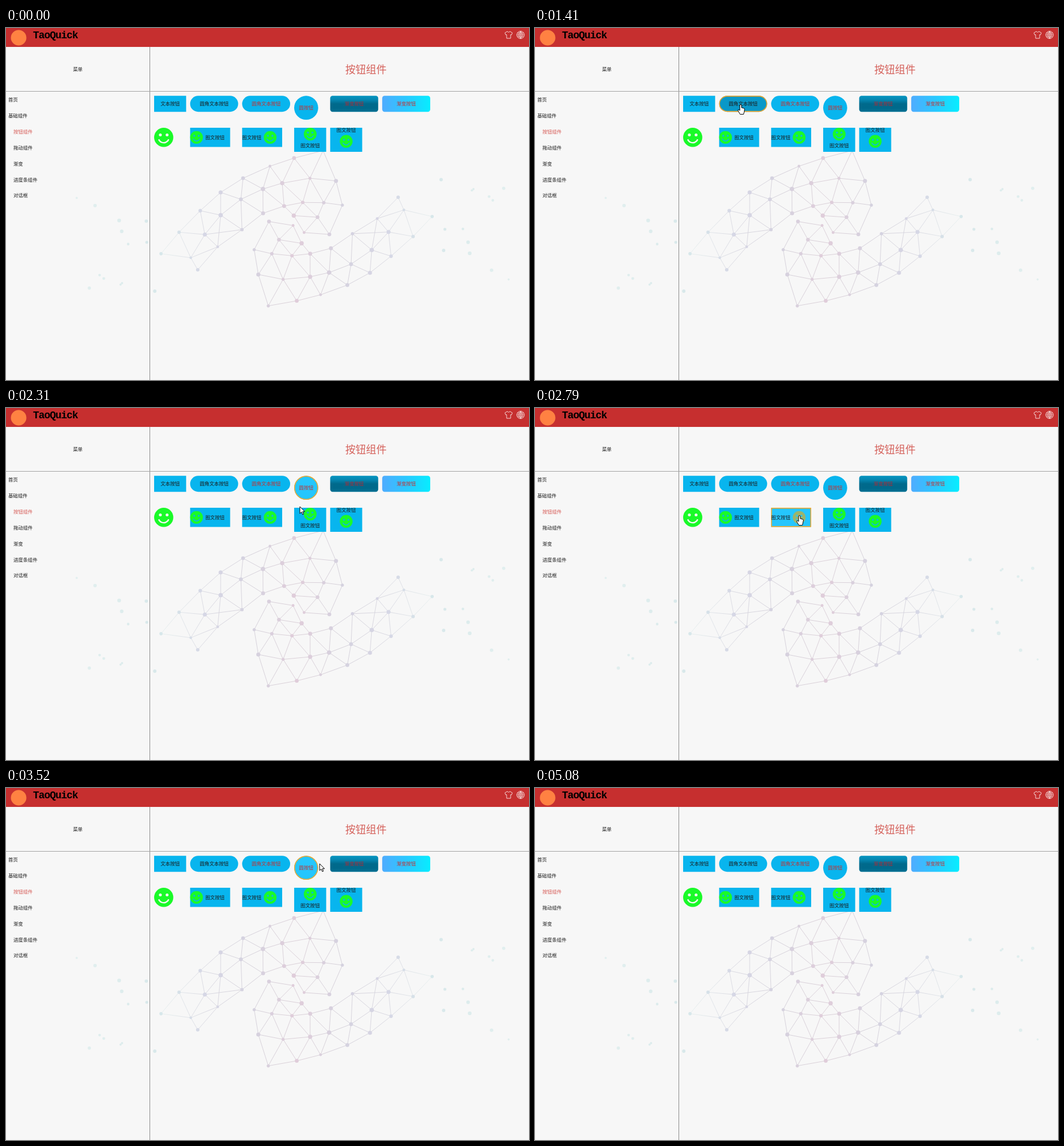
Animation, 911 px wide and 614 px high, one loop 5590 ms. Source, as an HTML page with a canvas:

```html
<!DOCTYPE html>
<html lang="zh-CN">
<head>
<meta charset="utf-8">
<style>
html, body { margin: 0; height: 100%; overflow: hidden; background: #f7f7f7; }
canvas { display: block; }
</style>
</head>
<body>
<canvas id="stage" width="911" height="614"></canvas>
<script>
const c = document.getElementById('stage').getContext('2d');
const LOOP = 5590, HOVER_LAG = 35;
const UNIT = 0.697; // stage pixels per layout unit
const PAPER = '#f7f7f7', RED = '#c62f2f', INK = '#1c1c1c', BLUE = '#08b5ee';
const CJK = '"Noto Sans CJK SC", "Noto Sans CJK", sans-serif';

// Pointer path: time, x, y
const path = [
  [190, 812, 612], [740, 305, 141], [1410, 358, 134], [1920, 503, 138], [2270, 520, 157],
  [2310, 512, 172], [2790, 461, 188], [3100, 345, 190], [3520, 546, 132], [3670, 590, 133],
  [4270, 598, 162], [4330, 593, 198], [4810, 605, 341], [5075, 886, 614]];

const menu = ['首页', '基础组件', '按钮组件', '拖动组件', '渐变', '进度条组件', '对话框'];

// Both rows share one column grid; sizes here are in layout units.
const rows = [
  [
    { w: 80, h: 40, label: '文本按钮' },
    { w: 120, h: 40, r: 20, label: '圆角文本按钮' },
    { w: 120, h: 40, r: 20, label: '圆角文本按钮', ink: RED },
    { w: 60, h: 60, r: 30, label: '圆按钮', ink: RED },
    { w: 120, h: 40, r: 6, label: '渐变按钮', ink: '#b02a35', vertical: true,
      stops: ['#0594c0', '#0586b0', '#006a8c', '#00698b', '#027093'] },
    { w: 120, h: 40, r: 6, label: '渐变按钮', ink: RED, stops: ['#4facfe', '#2ac8ff', '#06edff'] },
  ], [
    { w: 48, h: 48, icon: [24, 24, 24] },
    { w: 100, h: 48, label: '图文按钮', tx: 62, icon: [16, 24, 16] },
    { w: 100, h: 48, label: '图文按钮', tx: 24, icon: [70, 24, 16] },
    { w: 80, h: 60, label: '图文按钮', ty: 44, icon: [40, 16, 16] },
    { w: 80, h: 60, label: '图文按钮', ty: 6, icon: [40, 34, 16], hot: '#62a0da' },
  ]];

const buttons = rows.flatMap((row, j) => {
  let x = 0;
  return row.map(b => {
    const placed = { ...b, x: 258 + x * UNIT, y: 118.3 + j * 80 * UNIT };
    x += Math.max(b.w, rows[0][row.indexOf(b)].w, 80) + 10;
    return placed;
  });
});

let seed = 11;
function random() {
  seed = (seed * 16807) % 2147483647;
  return seed / 2147483647;
}
const between = (lo, hi) => lo + (hi - lo) * random();

// Nodes spread along a quadratic curve
function strand(count, x0, y0, cx, cy, x1, y1) {
  return Array.from({ length: count }, (_, i) => {
    const t = i / (count - 1), s = 1 - t;
    return {
      x: s * s * x0 + 2 * s * t * cx + t * t * x1 + between(-3, 3),
      y: s * s * y0 + 2 * s * t * cy + t * t * y1 + between(-3, 3),
      r: between(2.3, 4)
    };
  });
}

// Two nodes are linked when no third node sees them at a wide angle.
function linksOf(nodes) {
  const links = [];
  nodes.forEach((a, i) => nodes.slice(i + 1).forEach(b => {
    if (Math.hypot(a.x - b.x, a.y - b.y) > 84) return;
    const blocked = nodes.some(p => {
      if (p === a || p === b) return false;
      const ax = a.x - p.x, ay = a.y - p.y, bx = b.x - p.x, by = b.y - p.y;
      return ax * bx + ay * by < -0.2 * Math.hypot(ax, ay) * Math.hypot(bx, by);
    });
    if (!blocked) links.push([a, b]);
  }));
  return links;
}

const half = [
  ...strand(8, 273, 394, 377, 246, 552, 214),
  ...strand(8, 323, 399, 405, 250, 573, 264),
  ...strand(8, 331, 420, 470, 270, 584, 309),
  ...strand(2, 504, 330, 524, 330, 545, 331),
  ...strand(2, 520, 357, 542, 360, 564, 362)];
const wing = Array.from({ length: 13 }, () => ({ x: between(123, 262), y: between(293, 460), r: between(1.8, 3.3) }));

// The second half is the first turned by nearly half a circle.
const turn = n => ({ x: 970 - 0.96 * n.x + 0.08 * n.y, y: 745.5 - 0.085 * n.x - n.y, r: n.r });
const dots = [...half, ...wing].flatMap(n => [n, turn(n)]);
const links = linksOf(half).flatMap(([a, b]) => [[a, b], [turn(a), turn(b)]]);

function gradient(x0, y0, x1, y1, colors) {
  const g = c.createLinearGradient(x0, y0, x1, y1);
  colors.forEach((color, i) => g.addColorStop(i / (colors.length - 1), color));
  return g;
}
const mirrored = colors => gradient(120, 0, 892, 0, [...colors, ...colors.slice(0, -1).reverse()]);
const dotInk = mirrored(['#e2efef', '#deeded', '#d7e7ea', '#d6d6e5', '#d5d2df', '#e0cdda']);
const lineInk = mirrored(['#f4f6f6', '#f1f5f5', '#e2ecec', '#d2d1dc', '#cdc8d3', '#d4c6d0']);

function text(s, x, y, color = INK, align = 'center', size = 12 * UNIT, weight = 400, font = CJK) {
  c.font = `${weight} ${size}px ${font}`;
  c.textAlign = align;
  c.textBaseline = 'middle';
  c.fillStyle = color;
  c.fillText(s, x, y);
}

function disc(x, y, r, fill) {
  c.fillStyle = fill;
  c.beginPath();
  c.arc(x, y, r, 0, 2 * Math.PI);
  c.fill();
}

function shape(d, x, y, fill, stroke) {
  const p = new Path2D(d);
  c.save();
  c.translate(x, y);
  c.lineWidth = 1;
  c.lineJoin = 'round';
  if (fill) { c.fillStyle = fill; c.fill(p); }
  c.strokeStyle = stroke;
  c.stroke(p);
  c.restore();
}

function drawNetwork() {
  c.strokeStyle = lineInk;
  c.lineWidth = 0.8;
  c.beginPath();
  for (const [a, b] of links) { c.moveTo(a.x, a.y); c.lineTo(b.x, b.y); }
  c.stroke();
  for (const n of dots) disc(n.x, n.y, n.r, dotInk);
}

function drawWindow() {
  c.fillStyle = RED;
  c.fillRect(0, 0, 911, 33);
  disc(22, 17, 13.5, '#ff8142');
  c.letterSpacing = '-1.05px';
  text('TaoQuick', 47, 13, '#000', 'left', 18, 700, '"Liberation Mono", monospace');
  c.letterSpacing = '0px';
  shape('M4 0 Q6.5 3 9 0 L13 2.5 L11.5 6 L10 5.5 V12 H3 V5.5 L1.5 6 L0 2.5 Z', 869, 6, null, '#f4d4d4');
  shape('M0-6.5 A6.5 6.5 0 1 0 .01-6.5 M0-6.5 V6.5 M-6.5 0 H6.5 M-5.6-3.2 H5.6 M-5.6 3.2 H5.6' +
    'M0-6.5 Q-6 0 0 6.5 Q6 0 0-6.5', 896.3, 12, null, '#f4d4d4');
  c.fillStyle = '#8c8c8c';
  c.fillRect(250, 33, 1, 581);
  c.fillStyle = '#a4a4a4';
  c.fillRect(0, 110, 911, 1);
  text('菜单', 125, 72);
  text('按钮组件', 627, 72, '#d5625c', 'center', 18, 300);
  menu.forEach((s, i) => text(s, i < 2 ? 4 : 13, 125 + i * 40 * UNIT, i === 2 ? '#d65a55' : INK, 'left'));
}

function drawFace(x, y, r, fill, hole) {
  disc(x, y, r, fill);
  for (const side of [-1, 1]) disc(x + side * r * 0.35, y - r * 0.25, r * 0.15, hole);
  c.strokeStyle = hole;
  c.lineWidth = r * 0.14;
  c.beginPath();
  c.arc(x, y, r * 0.56, 0.12 * Math.PI, 0.88 * Math.PI);
  c.stroke();
}

function drawButton(b, hover, pressed) {
  const { w, h, r = 0 } = b;
  let fill = pressed ? '#0a98c8' : hover ? '#25c6fd' : BLUE;
  if (b.stops) fill = gradient(0, 0, b.vertical ? 0 : w, b.vertical ? h : 0, b.stops);
  c.save();
  c.translate(b.x, b.y);
  c.scale(UNIT, UNIT);
  if (b.label) {
    c.beginPath();
    c.roundRect(0, 0, w, h, r);
    c.fillStyle = fill;
    c.fill();
    if (hover && b.stops) {
      c.fillStyle = '#ffffff28';
      c.fill();
    } else if (hover) {
      c.beginPath();
      c.roundRect(1, 1, w - 2, h - 2, Math.max(0, r - 1));
      c.strokeStyle = '#ffa51e';
      c.lineWidth = 2;
      c.stroke();
    }
  }
  if (b.icon) drawFace(...b.icon, hover ? b.hot || '#9cb46c' : '#1afa29', b.label ? fill : PAPER);
  if (b.label) text(b.label, b.tx ?? w / 2, b.ty ?? h / 2, b.ink, 'center', 12);
  c.restore();
}

function pointerAt(t) {
  if (t < path[0][0] || t >= path.at(-1)[0]) return null;
  const i = path.findIndex(p => p[0] > t);
  const [t0, x0, y0] = path[i - 1], [t1, x1, y1] = path[i];
  const k = (t - t0) / (t1 - t0);
  return { x: x0 + (x1 - x0) * k, y: y0 + (y1 - y0) * k };
}

const inside = (p, b) => p && p.x >= b.x && p.x <= b.x + b.w * UNIT && p.y >= b.y && p.y <= b.y + b.h * UNIT;

function drawPointer(p) {
  const hand = 'M-1.5 8 V.5 Q0-1.2 1.5 .5 V5 L5.5 6 Q7 6.5 6.8 8 L6 13 L5 16.5 H-1 L-4.5 10.5 Q-5 8 -3 8.5 L-1.5 10 Z';
  const arrow = 'M0 0 V12 L2.8 9.4 L4.7 13.8 L6.6 13 L4.8 8.8 H8.6 Z';
  shape(buttons.some(b => inside(p, b)) ? hand : arrow, p.x, p.y, '#fff', '#000');
}

function render(now) {
  const t = now % LOOP;
  const pointer = pointerAt(t), hoverPoint = pointerAt(t - HOVER_LAG);
  const pressed = t >= 1370 && t < 1470;
  c.fillStyle = PAPER;
  c.fillRect(0, 0, 911, 614);
  drawNetwork();
  drawWindow();
  for (const b of buttons) {
    const hover = inside(hoverPoint, b);
    drawButton(b, hover, hover && pressed);
  }
  if (pointer) drawPointer(pointer);
}

const start = performance.now();
function tick() {
  render(performance.now() - start);
  requestAnimationFrame(tick);
}
tick();
</script>
</body>
</html>
```
